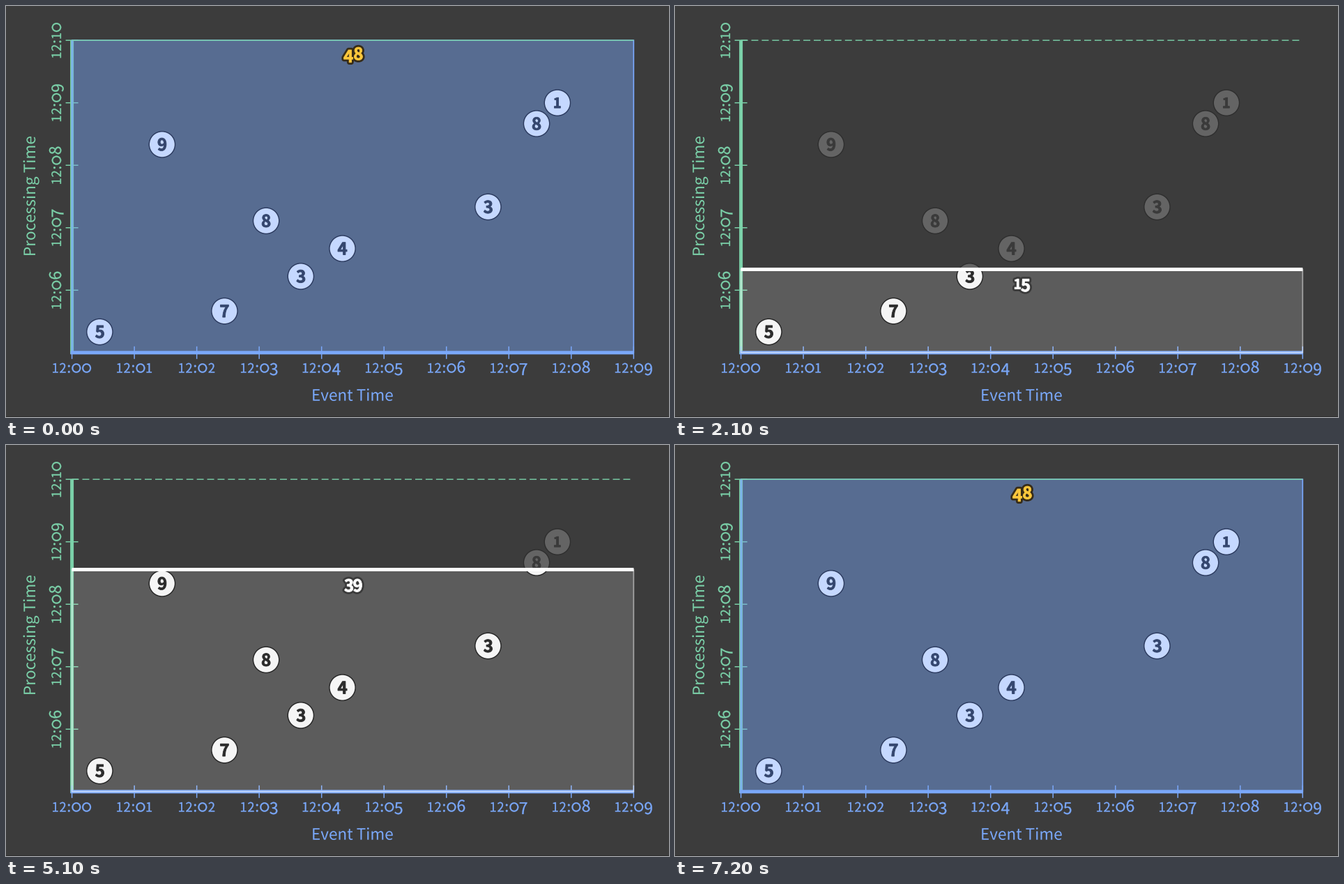
These frames come from a looping animation (951 by 589 pixels, 8 s). A matplotlib script:

```python
import numpy as np
import matplotlib.pyplot as plt
from matplotlib.animation import FuncAnimation
from matplotlib.patches import Circle, PathPatch, Rectangle
from matplotlib.path import Path
from matplotlib.textpath import TextPath
from matplotlib.transforms import Bbox

W, H, DPI = 951, 589, 100
PT = 72 / DPI                      # points per pixel
X0, Y0, UNIT = 94.6, 496.8, 9.947  # chart origin and size of one step
COLS, ROWS = 81, 45
STEP_MS, TICK_MS, LOOP_MS = 150, 50, 8000
LAST = ROWS + 3                    # step on which the window closes
PAUSE = 7                          # the line waits here for one step

BACK, GREEN, BLUE = "#3c3c3c", "#7bd1a9", "#7aa8fa"
FONT = "Noto Sans CJK JP"
HEAVY, BOOK = .9, .3               # extra stroke on bold and regular figures

# event time, processing time (in steps), value
EVENTS = [(4, 3, 5), (22, 6, 7), (33, 11, 3), (39, 15, 4), (28, 19, 8),
          (60, 21, 3), (13, 30, 9), (67, 33, 8), (70, 36, 1)]

# advance of each old-style numeral, in em
ADVANCE = {"0": .64, "1": .43, "2": .49, "3": .50, "4": .60, "5": .50,
           "6": .58, "7": .52, "8": .59, "9": .56, ":": .28}


def px(n):
    return X0 + n * UNIT


def py(n):
    return Y0 - n * UNIT


plt.rcParams["path.snap"] = False
fig = plt.figure(figsize=(W / DPI, H / DPI), dpi=DPI, facecolor=BACK)
ax = fig.add_axes([0, 0, 1, 1])
ax.set_xlim(0, W)
ax.set_ylim(H, 0)
ax.axis("off")


def letters(text, size, weight="normal"):
    path = TextPath((0, 0), text, size=size,
                    prop={"family": FONT, "weight": weight})
    return Path(path.vertices, path.codes)


def zero(size, weight):
    """A round, x-height zero standing on the baseline."""
    bold = weight == "bold"
    w, h = .28 * size, .292 * size
    tx, ty = (.15, .12) if bold else (.08, .075)
    unit = Path.unit_circle()
    outer = unit.vertices * [w, h]
    inner = unit.vertices * [tx * size - w, h - ty * size]
    ring = Path.make_compound_path(Path(outer, unit.codes),
                                   Path(inner, unit.codes))
    return Path(ring.vertices + [0, .285 * size], ring.codes)


def numerals(text, size, weight="normal"):
    """Old-style figures: 0-2 small, 6 and 8 tall, the rest hanging."""
    parts, x = [], 0
    for c in text:
        if c == "0":
            glyph = zero(size, weight)
        else:
            scale = .8 if c in "12" else .9 if c == ":" else 1
            glyph = letters(c, size * scale, weight)
        box = glyph.get_extents()
        drop = .15 * size if c in "34579" else 0
        mid = x + ADVANCE[c] * size / 2
        shift = [mid - (box.x0 + box.x1) / 2, -drop]
        parts.append(Path(glyph.vertices + shift, glyph.codes))
        x += ADVANCE[c] * size
    return Path.make_compound_path(*parts)


def place(path, x, y, turned=False, middle=False):
    """Centre a path on x; y is the baseline, or the centre if middle."""
    box = path.get_extents()
    dy = (box.y0 + box.y1) / 2 if middle else 0
    v = path.vertices - [(box.x0 + box.x1) / 2, dy]
    if turned:
        v = np.column_stack([-v[:, 1], v[:, 0]])
    return Path(v * [1, -1] + [x, y], path.codes)


def write(path, color, z=2, extra=0):
    return ax.add_patch(PathPatch(path, fc=color, ec=color if extra else "none",
                                  lw=extra * PT, zorder=z))


def line(xs, ys, color, width, z=1, **kw):
    return ax.plot(xs, ys, color=color, lw=width * PT, zorder=z,
                   solid_capstyle="butt", dash_capstyle="butt", **kw)[0]


right, top = px(COLS), py(ROWS)
line([0, W], [H - .5, H - .5], "#2e2e2e", 1)

# axes, ticks and titles
line([X0, X0], [top, Y0 + 2], GREEN, 5)
line([X0 - 2, right], [Y0, Y0], BLUE, 5)
for k in range(10):
    x = px(9 * k)
    line([x, x], [Y0 - 9, Y0 + 9], BLUE, 1.5)
    write(place(numerals(f"12:0{k}", 23), x, 525.5), BLUE, extra=BOOK)
for k in range(1, 6):
    y = py(9 * k)
    line([X0 - 9, X0 + 9], [y, y], GREEN, 1.5)
    write(place(numerals(f"12:{k + 5:02d}", 23), 79, y, turned=True),
          GREEN, extra=BOOK)
write(place(letters("Event Time", 22.5), 497.5, 565.7), BLUE)
write(place(letters("Processing Time", 22.6), 42, 272, turned=True), GREEN)

dashes = line([X0, right], [top, top], GREEN, 1.4,
              linestyle=(0, (UNIT / 1.4, UNIT / 2.8)))
top_edge = line([X0, right], [top, top], GREEN, 1.5, z=7)


def marker(event, z):
    n, m, value = event
    x, y = px(n), py(m)
    size = 20 if value == 1 else 24
    disc = ax.add_patch(Circle((x, y), 18.6, lw=1.4 * PT, zorder=z))
    digit = write(place(letters(str(value), size, "bold"), x, y, middle=True),
                  "k", z + .1, HEAVY)
    return disc, digit


def paint(mark, fill, edge, ink):
    disc, digit = mark
    disc.set(facecolor=fill, edgecolor=edge)
    digit.set(facecolor=ink, edgecolor=ink)


for e in EVENTS:
    paint(marker(e, 2), "#646464", "#2e2e2e", "#3a3a3a")
lit = [marker(e, 5) for e in EVENTS]

pane = ax.add_patch(Rectangle((X0, Y0), right - X0, 0, lw=0, zorder=3))
frame = ax.add_patch(Rectangle((X0, Y0), right - X0, 0, fill=False,
                               lw=1.7 * PT, zorder=4))
front = line([X0, right], [Y0, Y0], "white", 5, z=6)
halo = ax.add_patch(PathPatch(Path([[0, 0]]), lw=6.5 * PT, joinstyle="round",
                              zorder=8))
total = ax.add_patch(PathPatch(Path([[0, 0]]), lw=HEAVY * PT, zorder=9))
SUMS = {s: numerals(str(s), 24, "bold")
        for s in np.cumsum([v for _, _, v in EVENTS]).tolist()}


def update(k):
    step = min(k * TICK_MS // STEP_MS, LAST)
    done = step in (0, LAST)
    n = ROWS if done else step - 1 if step <= PAUSE else step - 2
    y = py(n)

    for box in (pane, frame):
        box.set_y(y)
        box.set_height(Y0 - y)
    pane.set(facecolor=BLUE if done else "white", alpha=.45 if done else .165)
    frame.set(edgecolor=BLUE if done else "white", alpha=1 if done else .5)
    front.set_ydata([y, y])
    front.set_visible(not done)
    top_edge.set_visible(done)
    dashes.set_visible(not done)

    clip = Bbox.from_extents(0, 0, W, H - y)
    for mark in lit:
        if done:
            paint(mark, "#c5d8ff", "#2b3a5e", "#34466e")
        else:
            paint(mark, "#f5f5f5", "#262626", "#2b2b2b")
        for part in mark:
            part.set_clip_box(clip)

    counted = n - 1 if step == PAUSE else n
    value = sum(v for _, m, v in EVENTS if m <= counted)
    for art in (halo, total):
        art.set_visible(value > 0)
    if value:
        path = place(SUMS[value], 498, y + 28)
        halo.set_path(path)
        total.set_path(path)
        edge = "#362c19" if done else "#3a3a3a"
        ink = "#ffc83c" if done else "white"
        halo.set(facecolor=edge, edgecolor=edge)
        total.set(facecolor=ink, edgecolor=ink)
    return []


anim = FuncAnimation(fig, update, frames=LOOP_MS // TICK_MS,
                     interval=TICK_MS, repeat=True, repeat_delay=0)
plt.show()
```
